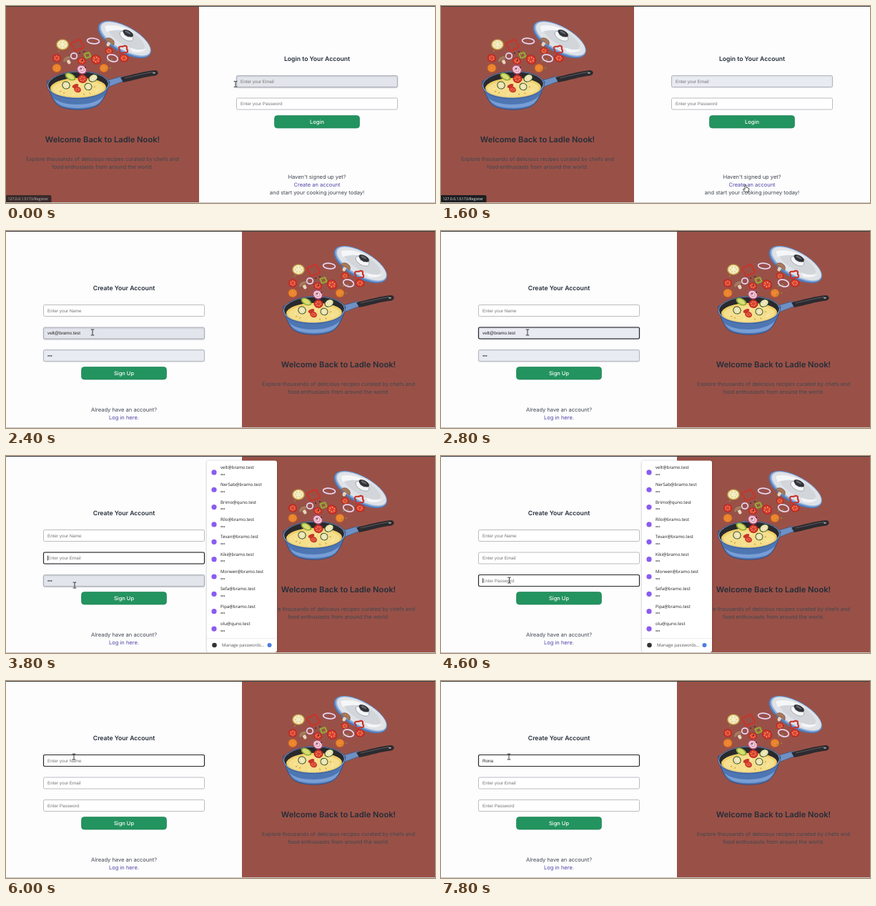
Animation, 600 px wide and 276 px high, one loop 8 s. Source, as an HTML page with a canvas:

```html
<!DOCTYPE html>
<html lang="en">
<head>
<meta charset="utf-8">
<title>Recipe sign-up</title>
<style>
html, body { margin: 0; width: 100%; height: 100%; overflow: hidden; background: #fdfdfe; }
canvas { display: block; width: 600px; height: 276px; }
</style>
</head>
<body>
<canvas id="stage"></canvas>
<script>
const W = 600, H = 276, LOOP = 8000, STEP = 200;
const canvas = document.getElementById('stage');
const dpr = window.devicePixelRatio || 1;
canvas.width = W * dpr;
canvas.height = H * dpr;
const c = canvas.getContext('2d');

const UI = 'Inter, sans-serif';
const FIELD = '"Liberation Sans", Arial, sans-serif';
const MENU = '"Open Sans", sans-serif';
const RUST = '#995147', INK = '#242d39', SOFT = '#414650', LINK = '#5046a5';

const EMAIL = 'velt@bramo.test';
const ACCOUNTS = [EMAIL, 'NerSab@bramo.test', 'Brimo@quno.test', 'Rilo@bramo.test',
  'Tevan@bramo.test', 'Kiki@bramo.test', 'Morwen@bramo.test', 'Sefa@bramo.test',
  'Pipa@bramo.test', 'olu@quno.test'];

// Pointer stops: time, x, y
const PATH = [[0, 321, 109.5], [400, 321, 109.5], [900, 365, 200], [1400, 426, 255],
  [1800, 426, 255], [2400, 121, 142], [3200, 121, 142], [3800, 96, 181],
  [4200, 96, 175], [5000, 95, 173], [5200, 95, 171], [5800, 95, 106]];

function text(s, x, y, size, font, color, align = 'center', weight = 400) {
  c.font = `${weight} ${size}px ${font}`;
  c.textAlign = align;
  c.fillStyle = color;
  c.fillText(s, x, y);
}

function rect(x, y, w, h, fill) {
  c.fillStyle = fill;
  c.fillRect(x, y, w, h);
}

function paint(fill, stroke, lw = 1) {
  if (fill) { c.fillStyle = fill; c.fill(); }
  if (stroke) { c.strokeStyle = stroke; c.lineWidth = lw; c.stroke(); }
}

function box(x, y, w, h, r, fill, stroke, lw) {
  c.beginPath();
  c.roundRect(x, y, w, h, r);
  paint(fill, stroke, lw);
}

function oval(x, y, rx, ry, rot, fill, stroke, lw) {
  c.beginPath();
  c.ellipse(x, y, rx, ry, rot, 0, 7);
  paint(fill, stroke, lw);
}

function shape(d, fill, stroke, lw) {
  const p = new Path2D(d);
  if (fill) { c.fillStyle = fill; c.fill(p); }
  if (stroke) { c.strokeStyle = stroke; c.lineWidth = lw; c.stroke(p); }
}

function shadow(blur, dy, color) {
  c.shadowBlur = blur * dpr;
  c.shadowOffsetY = dy * dpr;
  c.shadowColor = color;
}

// Ingredients
function slice(x, y, r, skin, flesh, seed, rot = 0, flat = .85) {
  oval(x, y, r, r * flat, rot, skin);
  oval(x, y, r * .82, r * .82 * flat, rot, flesh);
  for (let i = 0; i < 6; i++) {
    const a = i * Math.PI / 3 + rot;
    oval(x + Math.cos(a) * r * .48, y + Math.sin(a) * r * .48 * flat, r * .14, r * .1, a, seed);
  }
}
const tomato = (x, y, r, rot, flat) => slice(x, y, r, '#b8241f', '#d93f31', '#f0b070', rot, flat);
const courgette = (x, y, r, rot, flat) => slice(x, y, r, '#37502b', '#f3ecc0', '#d9cf8f', rot, flat);
const carrot = (x, y, r) => slice(x, y, r, '#d96a1d', '#ee8b34', '#dd7425', 0, .95);

function onion(x, y, rx, ry, rot) {
  oval(x, y, rx, ry, rot, null, '#a5628c', 2.4);
  oval(x, y, rx, ry, rot, null, '#eedfe9', 1.5);
}

function mushroom(x, y, rot) {
  c.save();
  c.translate(x, y);
  c.rotate(rot);
  box(-2.2, -1, 4.4, 8, 2, '#e6d3bd');
  shape('M-7 2C-8-7 8-7 7 2Q0-1-7 2Z', '#a9785c', '#775140', .7);
  c.restore();
}

function pepper(x, y, r, color, rot) {
  c.beginPath();
  for (let i = 0; i <= 36; i++) {
    const a = i * Math.PI / 18, k = r * (1 + .16 * Math.cos(a * 4));
    c.lineTo(x + Math.cos(a + rot) * k, y + Math.sin(a + rot) * k * .85);
  }
  c.closePath();
  paint(null, color, 2.2);
}

function lid() {
  c.save();
  c.translate(166, 46.5);
  c.rotate(.52);
  oval(0, .5, 41.5, 18.5, 0, '#4f7cbd');
  oval(.3, -.5, 40.5, 17, 0, '#8fb0dc');
  oval(.8, -1.2, 38.8, 15.6, 0, '#dfe2e6');
  oval(1, -3, 29, 10.5, 0, '#d2d6db');
  shape('M-33-2C-22-13-4-16 8-14C-8-11-20-5-27 4Z', '#f5f6f8');
  shape('M12 7Q26 4 33-3Q31 6 18 10Z', '#f5f6f8');
  oval(0, -5, 10.5, 5.5, 0, '#f4f5f6', '#9ca4ad', .8);
  shape('M-4-5L-3-10H4L3-5Z', '#777d84');
  oval(0, -9.5, 8, 4, 0, '#303237');
  oval(-1, -10.5, 4.5, 1.4, 0, '#62666d');
  c.restore();
}

function pan() {
  shape('M139 105L163 98L168 104L142 114Z', '#6e90c4', '#324c78', .6);
  shape('M160 100C178 96 194 91 209 90C214 91 214 96 209 97.5C194 99 180 104 164 107Z', '#2c2b2f');
  shape('M166 101C180 98 194 94 206 92.5', null, '#66666c', .8);
  oval(207, 93.8, 2, 1, -.1, '#aaa6a6');
  shape('M57.5 105C60 120 66 135 74 140C87 147 115 147 127 140C136 134 142 120 145 106Z',
    '#4d76b3', '#2c477a', .8);
  shape('M66 129C80 141 122 142 137 126C133 135 128 138 122 140C109 144 91 144 79 140C72 137 69 133 66 129Z',
    '#789ed5');
  oval(101, 110.5, 43.5, 19, -.03, '#7fa2d4', '#2f4b7c', .8);
  oval(101, 110, 42, 17.5, -.03, '#29292d');
  oval(101, 114.5, 39, 13.8, -.02, '#efcf69');
  oval(101, 115.5, 36, 11.8, -.02, '#f5df8d');
  for (let i = 0; i < 12; i++) {
    const a = i * 2.4;
    oval(101 + Math.cos(a) * 27, 117 + Math.sin(a) * 7, 1.4, .8, a, i % 2 ? '#d7a84a' : '#fbedb7');
  }
}

function dish(dx) {
  c.save();
  c.translate(dx, 0);
  pan();
  courgette(84, 111, 5.8, .6, .95);
  oval(90, 99, 8, 4.6, .5, '#8fab35');
  oval(90, 99, 6, 3, .5, '#d7dd72');
  tomato(107, 102, 6.5, .2, .9);
  courgette(122, 101, 7, -.5, .75);
  courgette(115, 113, 5.5, .4, .95);
  tomato(100, 117, 5, .4, .8);
  oval(97, 112, 4.5, 2.4, -.4, '#c9342a');
  lid();
  slice(79, 54, 8.8, '#c9a94d', '#f6edc3', '#ded097');
  pepper(100, 55, 8, '#c9342a', .3);
  onion(122, 49, 8.5, 3.8, .1);
  mushroom(145, 50, .5);
  tomato(144, 63, 5.5, .3);
  pepper(164, 61, 6, '#c9342a', .6);
  tomato(71, 73, 6, .5, .95);
  mushroom(86, 75, -.5);
  onion(95, 70, 4.3, 4, 0);
  tomato(106, 77, 6, .2, .8);
  pepper(114, 69, 4, '#96a936', .4);
  tomato(126, 75, 7.5, .7, .85);
  onion(149, 73, 7.5, 4.8, .3);
  tomato(165, 73, 6.5, .1, .85);
  carrot(71, 87, 6.4);
  carrot(137, 87, 6.2);
  oval(106, 89, 7.5, 6.5, .5, '#b04b72');
  oval(106, 89, 6, 5, .5, '#f1cdd8');
  oval(106, 89, 3.4, 2.6, .5, null, '#c96c91', .8);
  for (let i = 0; i < 11; i++)
    oval(74 + i * 37 % 76, 63 + i * 23 % 34, .9, .9, 0, i % 2 ? '#3c2423' : '#8a9a37');
  c.restore();
}

function panel(x) {
  rect(x, 0, 270, H, RUST);
  dish(x);
  const mid = x + 135;
  text('Welcome Back to Ladle Nook!', mid, 187.4, 11.2, UI, INK, 'center', 600);
  text('Explore thousands of delicious recipes curated by chefs and', mid, 215, 7.5, UI, SOFT);
  text('food enthusiasts from around the world.', mid, 226, 7.5, UI, SOFT);
}

function field(x, y, hint, o = {}) {
  c.save();
  if (o.auto) shadow(1.5, .8, `rgba(40,50,70,${o.hover ? .3 : .12})`);
  const fill = o.hover ? '#e2e5eb' : o.auto ? '#e8ebf2' : '#fff';
  box(x + .5, y + .5, 225, 16, 1.8, fill, '#a9abb0', .8);
  c.restore();
  if (o.focus) box(x + .5, y + .5, 225, 16, 1.8, null, '#26272a', 1.2);
  const value = o.value || '';
  if (o.selected) {
    c.font = `6.3px ${FIELD}`;
    rect(x + 6, y + 4.5, c.measureText(value).width, 8, '#a9cbf5');
  }
  text(value || hint, x + 6, y + 9.1, 6.3, FIELD, value ? '#222' : '#757575', 'left');
  if (o.caret) rect(x + 6 + (value ? c.measureText(value).width : 0), y + 5, .7, 7, '#111');
}

function button(x, y, label) {
  box(x + .5, y + .5, 119, 17.5, 4, '#23935f', '#23855a', .7);
  text(label, x + 60, y + 9.5, 7.5, UI, '#fff', 'center', 500);
}

function tooltip(alpha) {
  c.globalAlpha = alpha;
  box(-2, 265, 65.5, 13, 2, '#1d1e20');
  text('127.0.0.1:5173/Register', 2.5, 270.5, 5.2, MENU, '#f0f0f0', 'left');
  c.globalAlpha = 1;
}

function login(t) {
  panel(0);
  text('Login to Your Account', 435, 74.7, 8.65, UI, INK, 'center', 600);
  field(322, 97, 'Enter your Email', { auto: true, hover: t < 600 });
  field(322, 128.5, 'Enter your Password');
  button(375, 153, 'Login');
  text("Haven't signed up yet?", 435, 240, 7.5, UI, SOFT);
  text('Create an account', 435, 251, 7.5, UI, LINK);
  text('and start your cooking journey today!', 435, 262, 7.5, UI, SOFT);
  if (t < 200) tooltip(.75);
  if (t >= 1400) tooltip(1);
}

function menu() {
  c.save();
  shadow(3, .5, 'rgba(0,0,0,.3)');
  box(281, 6.5, 98, 268.5, 3, '#fff');
  c.restore();
  ACCOUNTS.forEach((name, i) => {
    const y = 16.4 + i * 24.35;
    oval(291, y + 6.5, 3.6, 3.6, 0, '#8a5cf0');
    text(name, 300, y, 6.1, MENU, '#1c1c1c', 'left', 500);
    text('•••', 300, y + 9.5, 6, FIELD, '#333', 'left');
  });
  rect(281, 255, 98, .7, '#e3e5e8');
  oval(291.5, 265, 3.3, 3.3, 0, '#333');
  text('Manage passwords...', 302, 265.3, 6.1, MENU, '#555', 'left');
  oval(368.5, 265, 3, 3, 0, '#4c7fe0');
}

function typed(t) {
  const n = t < 7000 ? 0 : t < 7200 ? 1 : t < 7400 ? 2 : t < 7600 ? 3 : 4;
  return 'Rona'.slice(0, n);
}

function signup(t) {
  panel(330);
  text('Create Your Account', 165, 80.3, 8.65, UI, INK, 'center', 600);
  const blink = t % 1000 >= 600;
  field(52, 103, 'Enter your Name', {
    focus: t >= 6000, value: typed(t), caret: t >= 6000 && blink && t < 7800
  });
  const hasMail = t < 3200;
  field(52, 134.5, 'Enter your Email', {
    value: hasMail ? EMAIL : '', auto: hasMail, hover: t >= 2400 && t < 2800,
    focus: t >= 2800 && t < 4200, selected: t >= 3000 && hasMail,
    caret: t >= 3200 && t < 4200 && blink
  });
  const hasPass = t < 4600;
  field(52, 166, 'Enter Password', {
    value: hasPass ? '•••' : '', auto: hasPass, hover: t >= 3800 && t < 4200,
    focus: t >= 4200 && t < 6000, selected: t >= 4400 && hasPass,
    caret: t >= 4600 && t < 6000 && blink
  });
  button(105, 190, 'Sign Up');
  text('Already have an account?', 165, 251, 7.55, UI, SOFT);
  text('Log in here.', 165, 262, 7.55, UI, LINK);
  if (t >= 3200 && t < 4200 || t >= 4600 && t < 5200) menu();
}

function pointer(t) {
  let i = PATH.findIndex(p => p[0] > t);
  if (i < 0) i = PATH.length;
  const a = PATH[i - 1], b = PATH[i] || a;
  const k = b === a ? 0 : (t - a[0]) / (b[0] - a[0]), e = k * k * (3 - 2 * k);
  const x = a[1] + (b[1] - a[1]) * e, y = a[2] + (b[2] - a[2]) * e;
  c.save();
  c.translate(x, y);
  if (t >= 1400 && t < 1800) {
    shape('M-1-4Q0-5 1-4V-.8L4 0Q5 .3 4.8 2L4 5.5H-.8L-3.6 2Q-3.6 .4-1 2Z', '#fff', '#222', .8);
  } else if (t >= 400 && t < 1400 || t >= 1800 && t < 2400) {
    shape('M0-4V5L2.2 3L3.8 6L5 5.4L3.6 2.6H6.5Z', '#fff', '#222', .7);
  } else {
    shape('M-2.3-4H-.6Q0-4 0-3.3Q0-4 .6-4H2.3M0-3.3V3.3M-2.3 4H-.6Q0 4 0 3.3Q0 4 .6 4H2.3', null, '#222', .9);
  }
  c.restore();
}

function draw(now) {
  const t = Math.floor(now % LOOP / STEP) * STEP;
  c.setTransform(dpr, 0, 0, dpr, 0, 0);
  c.textBaseline = 'middle';
  c.textRendering = 'geometricPrecision';
  rect(0, 0, W, H, '#fdfdfe');
  if (t < 1800) login(t); else signup(t);
  rect(0, 0, W, 1, '#383d42');
  rect(0, 275, W, 1, '#c9c4c4');
  pointer(t);
}

const start = performance.now();
function tick() {
  draw(performance.now() - start);
  requestAnimationFrame(tick);
}
tick();
</script>
</body>
</html>
```
